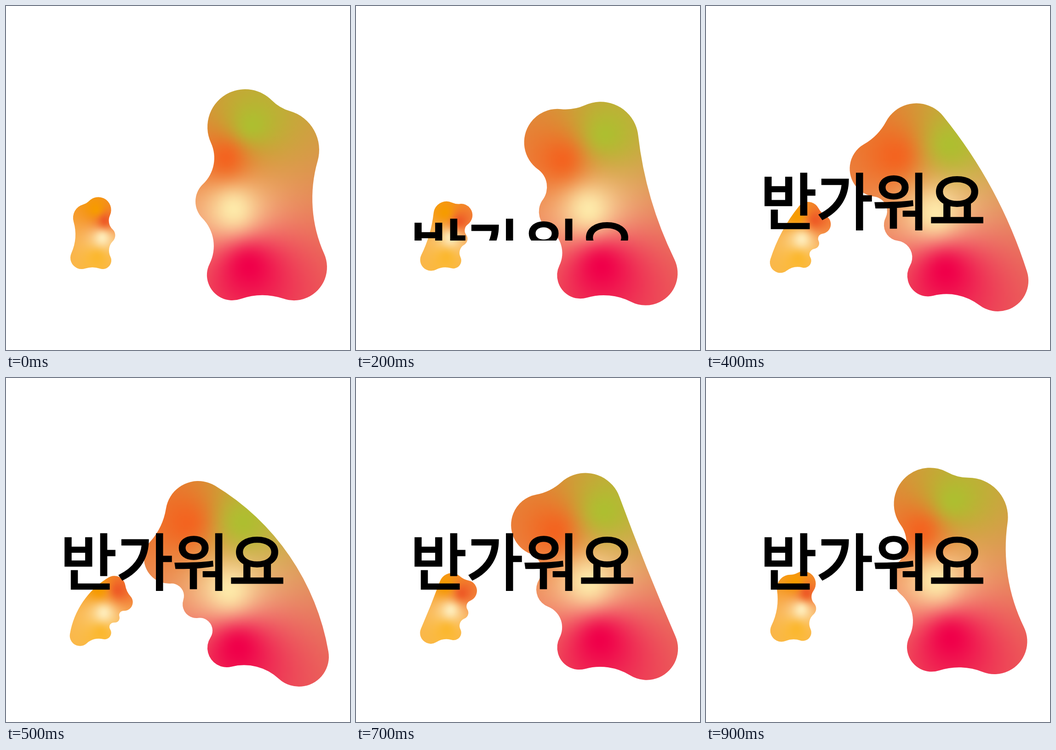
An HTML page with a canvas for the animation above (1 s loop, 748 by 748 pixels).

```html
<!DOCTYPE html>
<html lang="ko">
<head>
<meta charset="utf-8">
<title>반가워요</title>
<style>
  html, body { margin: 0; width: 100%; height: 100%; overflow: hidden; background: #fff; }
  canvas, svg { position: absolute; left: 0; top: 0; width: 748px; height: 748px; }
  text {
    font: 400 133px "Noto Sans CJK KR", "Noto Sans CJK", "Noto Sans KR", sans-serif;
    fill: #000; stroke: #000; stroke-width: 4.5px;
  }
</style>
</head>
<body>
<canvas id="stage" width="748" height="748"></canvas>
<svg viewBox="0 0 748 748">
  <clipPath id="window"><rect width="748" height="510"/></clipPath>
  <g clip-path="url(#window)"><text id="greeting" x="118" y="450">반가워요</text></g>
</svg>
<script>
const LOOP = 1000, STEP = 100;
const AREA = { x: 284, y: 164, w: 432, h: 524 }, CELL = 4;
const ctx = document.getElementById('stage').getContext('2d');
const greeting = document.getElementById('greeting');

// Quadratic path from a to b, drawn towards mid on the way
const glide = (s, a, b, mid = (a + b) / 2) =>
  (1 - s) * (1 - s) * a + 2 * s * (1 - s) * mid + s * s * b;

// Round lobes in clockwise order; k is the curvature of the joint to the next one
// (positive hollow, negative bulging). s is the lean: 0 upright, 1 bowed.
const lobes = s => [
  { x: glide(s, 520, 355, 384), y: glide(s, 263, 392, 302), r: glide(s, 82, 55), k: glide(s, .011, .007) },
  { x: glide(s, 593, 418), y: glide(s, 313, 295, 268), r: glide(s, 88, 71), k: glide(s, .0034, -.0019, 0) },
  { x: glide(s, 626, 637), y: glide(s, 568, 606), r: glide(s, 72, 65), k: glide(s, .0069, .009) },
  { x: glide(s, 492, 480), y: glide(s, 585, 587), r: glide(s, 55, 42), k: glide(s, .0116, .036, .0158) },
  { x: glide(s, 464, 414, 429), y: glide(s, 425, 492, 456), r: glide(s, 52, 30), k: glide(s, .0128, .037) }
];

// Colour centres: head, face, chest, base
const spots = s => [
  [glide(s, 535, 515, 554), glide(s, 258, 313, 288)],
  [glide(s, 478, 392, 435), glide(s, 330, 315, 344)],
  [glide(s, 495, 485, 522), glide(s, 442, 460, 436)],
  [glide(s, 528, 505, 547), glide(s, 568, 588, 563)]
];
const BIG = [[174, 190, 48], [243, 100, 32], [253, 232, 168], [240, 0, 74]];
const SMALL = [[246, 155, 0], [238, 92, 38], [254, 234, 182], [251, 184, 48]];

// Circle that touches lobes a and b
function joint(a, b) {
  const R = 1 / (a.k || 1e-5), da = a.r + R, db = b.r + R;
  const d = Math.hypot(b.x - a.x, b.y - a.y);
  const ux = (b.x - a.x) / d, uy = (b.y - a.y) / d;
  const along = (da * da - db * db + d * d) / (2 * d);
  const out = Math.sign(R) * Math.sqrt(Math.max(0, da * da - along * along));
  const x = a.x + ux * along + uy * out, y = a.y + uy * along - ux * out;
  // direction from a lobe to its touching point
  const angle = l => Math.atan2((y - l.y) * Math.sign(R), (x - l.x) * Math.sign(R));
  return { x, y, R, leave: angle(a), enter: angle(b) };
}

function outline(parts) {
  const path = new Path2D(), n = parts.length;
  const joints = parts.map((p, i) => joint(p, parts[(i + 1) % n]));
  parts.forEach((p, i) => {
    const j = joints[i], turn = j.R > 0 ? Math.PI : 0;
    path.arc(p.x, p.y, p.r, joints[(i + n - 1) % n].enter, j.leave);
    path.arc(j.x, j.y, Math.abs(j.R), j.leave + turn, j.enter + turn, j.R > 0);
  });
  path.closePath();
  return path;
}

// Colour field weighted by inverse squared distance to each spot
function field(centres, colors) {
  const cv = document.createElement('canvas');
  cv.width = AREA.w / CELL;
  cv.height = AREA.h / CELL;
  const c = cv.getContext('2d'), img = c.createImageData(cv.width, cv.height);
  let p = 0;
  for (let row = 0; row < cv.height; row++) {
    for (let col = 0; col < cv.width; col++) {
      const x = AREA.x + (col + .5) * CELL, y = AREA.y + (row + .5) * CELL;
      const w = centres.map(([cx, cy]) => 1 / ((x - cx) ** 2 + (y - cy) ** 2 + 1));
      const total = w.reduce((sum, v) => sum + v);
      for (let k = 0; k < 3; k++) {
        img.data[p++] = colors.reduce((sum, rgb, i) => sum + rgb[k] * w[i], 0) / total;
      }
      img.data[p++] = 255;
    }
  }
  c.putImageData(img, 0, 0);
  return cv;
}

function drawBody(path, centres, colors, matrix) {
  ctx.save();
  ctx.setTransform(...matrix);
  ctx.clip(path);
  ctx.imageSmoothingQuality = 'high';
  ctx.drawImage(field(centres, colors), AREA.x, AREA.y, AREA.w, AREA.h);
  ctx.restore();
}

// Bow until 500 ms, then straighten up slightly faster
function lean(t) {
  const x = t < 500 ? t / 500 : Math.max(0, (980 - t) / 480);
  return x ** 1.15;
}

function draw(t) {
  const s = lean(t), path = outline(lobes(s)), centres = spots(s);
  ctx.clearRect(0, 0, 748, 748);
  drawBody(path, centres, SMALL, [-.341, 0, 0, .341, 378, 353.8]);
  drawBody(path, centres, BIG, [1, 0, 0, 1, 0, 0]);
  greeting.setAttribute('transform', `translate(0 ${Math.max(0, 225 - t / 2)})`);
}

let shown = -1;
const start = performance.now();
function tick(now) {
  const t = Math.floor(Math.max(0, now - start) % LOOP / STEP) * STEP;
  if (t !== shown) draw(shown = t);
  requestAnimationFrame(tick);
}
tick(start);
</script>
</body>
</html>
```
